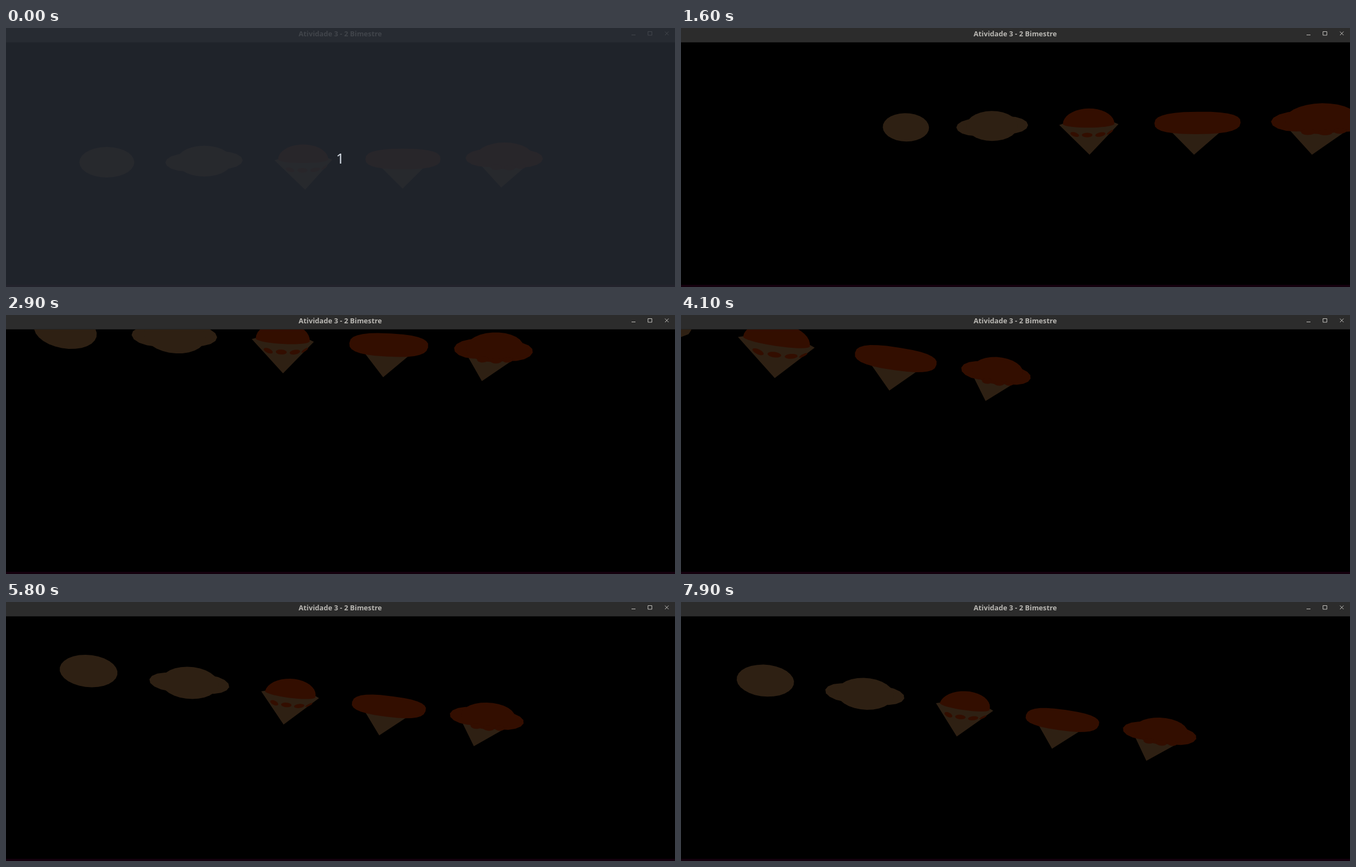
Recreate the animation shown at these times as an HTML page with a canvas. Size 1201 by 466 pixels, loop 8000 ms.

```html
<!DOCTYPE html>
<html lang="pt">
<head>
<meta charset="utf-8">
<style>
  html, body { margin: 0; width: 100%; height: 100%; overflow: hidden; background: #000; }
  #stage { position: relative; width: 1201px; height: 466px; overflow: hidden; background: #000; }
  #stage > * { position: absolute; left: 0; top: 0; }
  #bar { width: 1201px; height: 25px; background: #2c2c2c; border-bottom: 1px solid #242424; }
  #title { width: 1200px; top: 1px; line-height: 19px; text-align: center; color: #b8b6b2;
           font: bold 12.7px/19px "Noto Sans", sans-serif; white-space: pre; }
  #strip { top: 462px; width: 1201px; height: 4px; background: #14000d; }
  #dim { width: 1201px; height: 466px; background: rgba(39, 43, 52, .82); }
  #count { width: 1200px; top: 216px; text-align: center; color: #d3dae3;
           font: 26px/36px "Noto Sans", sans-serif; }
</style>
</head>
<body>
<div id="stage">
  <canvas id="view" width="1201" height="466"></canvas>
  <div id="strip"></div>
  <div id="bar"></div>
  <div id="title">Atividade 3 - 2 Bimestre</div>
  <svg width="1201" height="26" fill="none" stroke="#c4c2be">
    <path d="M1123 12.5h7M1152.5 6.5h7v6.5h-7zM1183 6.5l6.5 6.5M1189.5 6.5l-6.5 6.5"/>
  </svg>
  <div id="dim"><div id="count" style="position:absolute">1</div></div>
</div>
<script>
const ctx = document.getElementById('view').getContext('2d');
const dim = document.getElementById('dim');
const LOOP = 8000, CREAM = '#2e2013', RED = '#330e00';

// Lens: 45 degree view with a 16:9 aspect stretched over the window.
const FX = 815, FY = 526, CX = 600.5, CY = 244;

// Camera keys: time, screen position of the middle cone's tip, slope of the row.
const KEYS = [
  [600, 712, 289, -.0114], [1200, 848, 286, -.003], [1500, 915, 240, 0],
  [1600, 921, 228, 0], [2100, 908, 156, .003], [2400, 826, 136, .012],
  [2900, 677, 112, .039], [3200, 672, 86, .04], [3300, 653, 87, .044],
  [3900, 393, 114, .107], [4100, 374, 136, .109], [4200, 374, 145, .109],
  [5000, 390, 238, .109], [5100, 425, 239, .11], [5800, 670, 240, .114],
  [6000, 754, 248, .109], [6100, 758, 252, .108], [6600, 758, 252, .108],
  [7000, 758, 136, .111], [7100, 758, 136, .111], [7200, 712, 138, .117],
  [7400, 644, 141, .129], [7800, 657, 265, .129], [7900, 666, 264, .129]
];

const ellipse = (color, x, y, rx, ry, tilt = 0, power = 2, sides = 28) => {
  const bend = v => Math.sign(v) * Math.abs(v) ** (2 / power);
  const points = Array.from({ length: sides }, (_, i) => {
    const a = i / sides * 2 * Math.PI;
    const u = rx * bend(Math.cos(a)), v = ry * bend(Math.sin(a));
    return [x + u * Math.cos(tilt) - v * Math.sin(tilt), y + u * Math.sin(tilt) + v * Math.cos(tilt)];
  });
  return { color, points };
};
const polygon = (color, ...points) => ({ color, points });
const dome = (x, y, rx, up, down) => {
  const shape = ellipse(RED, 0, 0, rx, 1, 0, 2, 36);
  shape.points = shape.points.map(([u, v]) => [x + u, y + v * (v < 0 ? up : down)]);
  return shape;
};
const lobes = (color, x, y, ry, left, right) => [
  ellipse(color, x - 32, left, 38, 16, 0, 2, 16),
  ellipse(color, x + 31, right, 38, 16, 0, 2, 16),
  ellipse(color, x, y, 50, ry)
];

const shapes = [
  ellipse(CREAM, 181, 241.5, 49.3, 27.5),
  ...lobes(CREAM, 356, 239.5, 27.7, 242, 238),
  polygon(CREAM, [482, 238], [490, 235.5], [578, 234], [585.5, 237], [537, 291]),
  dome(533.5, 236.5, 45, 27, 6.5),
  ellipse(RED, 510, 255, 8, 3.6, .35),
  ellipse(RED, 532, 256, 9.2, 4),
  ellipse(RED, 555, 255, 8.8, 3.7, -.22),
  ellipse(RED, 571.5, 251, 6.5, 1.8, -.65),
  polygon(CREAM, [664, 241], [760, 241], [712, 289]),
  ellipse(RED, 712.7, 235.7, 67.5, 18.5, 0, 2.6),
  polygon(CREAM, [847, 241], [942, 241], [889, 287]),
  ...lobes(RED, 895, 230, 24, 234, 235),
  ellipse(RED, 880, 250.5, 10, 5),
  ellipse(RED, 904, 251.5, 10, 4.5),
  ellipse(RED, 924, 249, 9, 4.5)
];

const cross = (a, b) => [a[1] * b[2] - a[2] * b[1], a[2] * b[0] - a[0] * b[2], a[0] * b[1] - a[1] * b[0]];
const dot = (a, b) => a[0] * b[0] + a[1] * b[1] + a[2] * b[2];
const unit = a => a.map(v => v / Math.hypot(...a));
const ray = (x, y) => [(x - CX) / FX, (y - CY) / FY, 1];

// Orthonormal axes fixed by the tip's ray and the plane through the row of cones.
function axes([x, y, slope]) {
  const d = unit(ray(x, y));
  const n = unit(cross(d, [1 / FX, slope / FY, 0]));
  return [d, n, cross(d, n)];
}
const home = axes(KEYS[0].slice(1));

function poseAt(t) {
  const next = KEYS.findIndex(k => k[0] >= t);
  if (next < 1) return KEYS[0].slice(1);
  const a = KEYS[next - 1], b = KEYS[next];
  const p = (t - a[0]) / (b[0] - a[0]);
  return [1, 2, 3].map(i => a[i] + (b[i] - a[i]) * p);
}

function draw(t) {
  const now = axes(poseAt(t));
  const project = ([x, y]) => {
    const r = ray(x, y), c = home.map(axis => dot(axis, r));
    const [u, v, w] = [0, 1, 2].map(i => c[0] * now[0][i] + c[1] * now[1][i] + c[2] * now[2][i]);
    return [CX + FX * u / w, CY + FY * v / w];
  };
  ctx.fillStyle = '#000';
  ctx.fillRect(0, 0, 1201, 466);
  for (const { color, points } of shapes) {
    ctx.fillStyle = color;
    ctx.beginPath();
    points.forEach(p => ctx.lineTo(...project(p)));
    ctx.fill();
  }
  dim.style.display = t < 100 ? 'block' : 'none';
}

const start = performance.now();
function tick() {
  const t = (performance.now() - start) % LOOP;
  draw(Math.floor(t / 100) * 100);
  requestAnimationFrame(tick);
}
tick();
</script>
</body>
</html>
```
